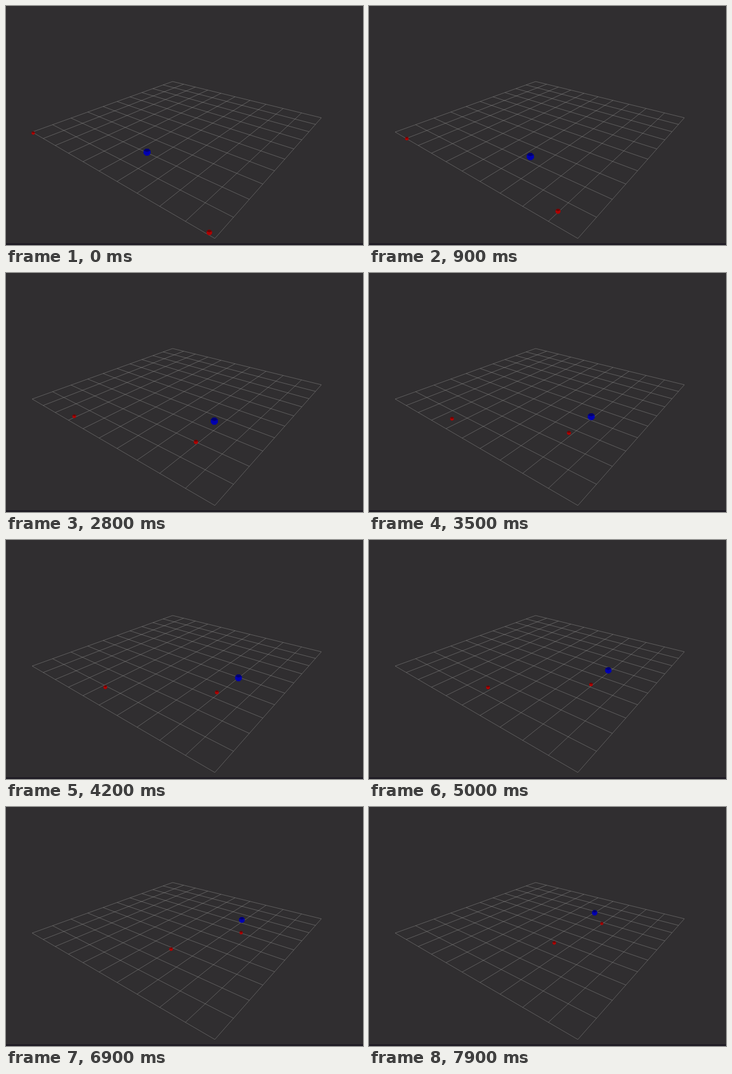
These frames come from a looping animation (600x402 px, 8000 ms). An HTML page with a canvas:

```html
<!DOCTYPE html>
<html lang="en">
<head>
<meta charset="utf-8">
<title>Pursuit on a grid</title>
<style>
  html, body { margin: 0; width: 100%; height: 100%; overflow: hidden; background: #302e30; }
  canvas { display: block; }
</style>
</head>
<body>
<canvas id="stage" width="600" height="402"></canvas>
<script>
const ctx = document.getElementById('stage').getContext('2d');
const LOOP = 8000, STEP = 100, HALF = 5;
const ORBIT = 3, START = -81.8 * Math.PI / 180, TURN = 0.336, SPEED = 1;

// Perspective map from the ground plane (-5..5 on both axes) to the stage.
function project(x, y) {
  const u = (x + HALF) / 10, v = (y + HALF) / 10;
  const w = 1 - 0.42198 * u + 0.53014 * v;
  return {
    x: (44 + 158.885 * u + 384.44 * v) / w,
    y: (212 + 14.006 * u - 17.67 * v) / w,
    scale: 1 / w
  };
}

function line(x1, y1, x2, y2) {
  const a = project(x1, y1), b = project(x2, y2);
  ctx.moveTo(a.x, a.y);
  ctx.lineTo(b.x, b.y);
}

function drawGrid() {
  ctx.beginPath();
  for (let i = -HALF; i <= HALF; i++) {
    line(i, -HALF, i, HALF);
    line(-HALF, i, HALF, i);
  }
  ctx.lineWidth = 1;
  ctx.strokeStyle = 'rgba(160,160,158,0.42)';
  ctx.stroke();
}

function polygon(points, color) {
  ctx.beginPath();
  points.forEach(p => ctx.lineTo(p[0], p[1]));
  ctx.closePath();
  ctx.fillStyle = color;
  ctx.fill();
}

// Coarse ball: an eight-sided outline with a dark cap over a plain body.
function drawBall(pos, size, [dark, body]) {
  const { x, y, scale } = project(pos.x, pos.y);
  const r = size * scale;
  const rim = Array.from({ length: 8 }, (_, i) => {
    const a = (i + 0.5) * Math.PI / 4;
    return [x + r * Math.cos(a), y + r * Math.sin(a)];
  });
  polygon(rim, body);
  polygon([...rim.slice(4), [x, y - 0.1 * r]], dark);
}

const BLUE = ['#000070', '#0000b0'];
const RED = ['#6a0404', '#b00202'];

const leaderAt = t => ({
  x: ORBIT * Math.cos(START + TURN * t),
  y: ORBIT * Math.sin(START + TURN * t)
});

function chase(p, goal, dt) {
  const dx = goal.x - p.x, dy = goal.y - p.y;
  const k = SPEED * dt / Math.hypot(dx, dy);
  return { x: p.x + dx * k, y: p.y + dy * k };
}

// The first follower chases the leader, the second chases the first.
function poseAt(step) {
  const dt = STEP / 1000;
  let first = { x: 4.77, y: -4.92 }, second = { x: -4.86, y: -5.02 };
  for (let i = 0; i < step; i++) {
    const next = chase(first, leaderAt(i * dt), dt);
    second = chase(second, first, dt);
    first = next;
  }
  return { leader: leaderAt(step * dt), first, second };
}

function draw(ms) {
  const pose = poseAt(Math.floor(ms % LOOP / STEP));
  ctx.fillStyle = '#302e30';
  ctx.fillRect(0, 0, 600, 402);
  ctx.fillStyle = '#1f1c25';
  ctx.fillRect(0, 399, 600, 3);
  drawGrid();
  drawBall(pose.second, 2.9, RED);
  drawBall(pose.leader, 5.6, BLUE);
  drawBall(pose.first, 2.9, RED);
}

const start = performance.now();
function frame() {
  draw(performance.now() - start);
  requestAnimationFrame(frame);
}
frame();
</script>
</body>
</html>
```
